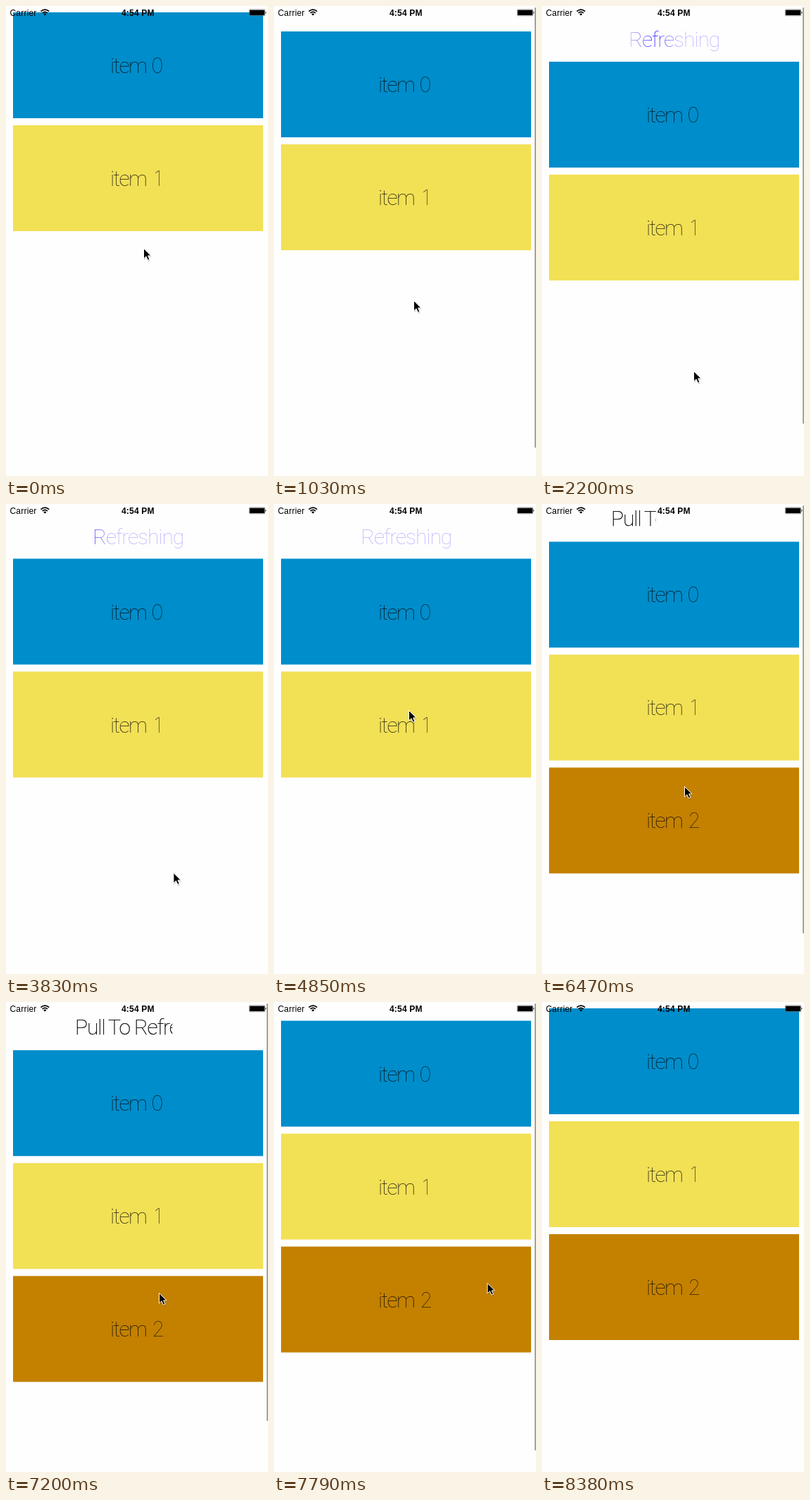
An HTML page that plays this animation: 372 px wide and 666 px high, repeating every 8820 ms.

```html
<!DOCTYPE html>
<html lang="en">
<head>
<meta charset="utf-8">
<title>Pull to refresh</title>
<style>
  html, body { margin: 0; width: 100%; height: 100%; overflow: hidden; background: #fefefe; }
  svg { display: block; width: 372px; height: 666px; }
  .thin { font: 100 30px Roboto, Inter, Lato, sans-serif; letter-spacing: -1.05px; }
  .item { letter-spacing: -1.6px; opacity: .82; }
  .digit { font-family: Inter, Roboto, sans-serif; }
  .status { font: 12px "Liberation Sans", Arial, sans-serif; letter-spacing: .2px; }
  .bold { font-weight: 700; }
</style>
</head>
<body>
<svg viewBox="0 0 372 666">
  <defs>
    <linearGradient id="shine" gradientUnits="userSpaceOnUse" x1="-35" x2="35" y1="0" y2="0">
      <stop offset="0" stop-color="#b9b2ff"/>
      <stop offset=".5" stop-color="#2a1cff"/>
      <stop offset="1" stop-color="#b9b2ff"/>
    </linearGradient>
    <clipPath id="reveal"><rect id="wipe" x="98" y="-70" width="0" height="70"/></clipPath>
  </defs>

  <g id="content">
    <g id="pullLabel" class="thin" clip-path="url(#reveal)" stroke="#000" stroke-width=".25">
      <text y="-22.5"><tspan x="98">Pull</tspan><tspan x="145">To</tspan><tspan x="182">Refresh</tspan></text>
    </g>
    <text id="busyLabel" class="thin" x="123.3" y="-20.7" fill="url(#shine)">Refreshing</text>
    <g id="cards"></g>
  </g>

  <rect id="bar" x="370" y="2" width="2" rx="1" fill="#a3a3a3"/>

  <g id="statusBar">
    <text class="status" x="5.5" y="14">Carrier</text>
    <text class="status bold" x="164" y="14">4:54 PM</text>
    <g fill="none" stroke="#000" stroke-width="1.7">
      <path d="M49.4 7.6Q55.3 2.6 61.2 7.6"/>
      <path d="M51.6 9.9Q55.3 6.8 59 9.9"/>
    </g>
    <path d="M53.2 11.4Q55.3 9.8 57.4 11.4L55.3 13.6Z"/>
    <rect x="345.3" y="5" width="22.4" height="8.8" rx="1" fill="none" stroke="#666" stroke-width=".7"/>
    <rect x="346" y="5.7" width="21" height="7.4" rx=".5"/>
    <path d="M368.4 7.6Q370.4 9.4 368.4 11.2Z"/>
  </g>

  <g id="cursor">
    <path d="M1 2V17L4.5 13.8L7 19.3L9.6 18.2L7.2 12.8H12Z" opacity=".18"/>
    <path d="M.5 .5V15L4 11.8L6.4 17.2L8.9 16.1L6.6 10.9H11Z" stroke="#fff" stroke-linejoin="round"/>
  </g>
</svg>

<script>
const TICK = 147, TICKS = 60, REST = 9;

// Moments of the story, counted in ticks
const DRAG = 3, LET_GO = 13, BUSY = 14, DONE = 35, DRAG2 = 39, LET_GO2 = 51, SETTLED = 57;

// Pointer path: [tick, x, y]
const PATH = [
  [DRAG, 195, 343], [7, 198, 417], [12, 213, 514], [15, 215, 517], [19, 244, 555], [25, 244, 555],
  [33, 191, 292], [DRAG2, 191, 292], [44, 202, 400], [49, 217, 412], [LET_GO2, 221, 416], [55, 384, 380]
];

const $ = id => document.getElementById(id);
const ramp = (k, a, b) => Math.min(1, Math.max(0, (k - a) / (b - a)));
const smooth = f => f * f * (3 - 2 * f);
const show = (el, on) => el.setAttribute("visibility", on ? "visible" : "hidden");
const move = (el, x, y) => el.setAttribute("transform", `translate(${x} ${y})`);

// How far the list is pulled below its resting place
function pullAt(k) {
  if (k <= LET_GO) return 79 * smooth(ramp(k, DRAG, 12) ** 1.15);
  if (k <= DONE) return 68.5 + 10.5 * Math.exp(LET_GO - k);
  if (k <= DRAG2) return 68.5 * (1 - ramp(k, DONE, 37)) ** 1.6;
  if (k <= LET_GO2) return 59.3 * (1 - (1 - ramp(k, DRAG2, 49)) ** 2);
  return 59.3 * (1 - ramp(k, LET_GO2, SETTLED)) ** 3;
}

function pointerAt(k) {
  let [, x, y] = PATH[0];
  for (let i = 1; i < PATH.length; i++) {
    const [t0, x0, y0] = PATH[i - 1], [t1, x1, y1] = PATH[i];
    const f = ramp(k, t0, t1);
    x += (x1 - x0) * f;
    y += (y1 - y0) * f;
  }
  return [x, y];
}

function barOpacity(k) {
  if (k < DRAG2) return k > DRAG ? 1 - ramp(k, 16, 19) : 0;
  return k > DRAG2 ? 1 - ramp(k, 55, SETTLED) : 0;
}

const digitX = [206, 210, 207];
$("cards").innerHTML = ["#008dcb", "#f2e055", "#c48100"].map((color, i) => `
  <g transform="translate(0 ${i * 160})">
    <rect x="10" width="355" height="150" fill="${color}"/>
    <text class="thin item" x="148" y="86">item <tspan class="digit" x="${digitX[i]}">${i}</tspan></text>
  </g>`).join("");
const third = $("cards").lastElementChild;

function draw(ms) {
  const k = Math.floor((ms + 14) / TICK) % TICKS;
  const pull = pullAt(k);
  const busy = k >= BUSY && k <= DONE;
  move($("content"), 0, REST + pull);

  // The label is written from left to right as the pull grows
  const drawn = ramp(pull, 32.2, 68);
  $("wipe").setAttribute("width", 2 + drawn * 180);
  show($("pullLabel"), !busy && drawn > 0);
  show($("busyLabel"), busy);
  const shineX = k < 25 ? 160 + 35 * (k - 15) : 90 + 25 * (k - 25);
  move($("shine"), 0, 0);
  $("shine").setAttribute("gradientTransform", `translate(${shineX} 0)`);

  third.setAttribute("opacity", ramp(k, DONE, 37));
  $("bar").setAttribute("height", (busy ? 660 : 651) - pull);
  $("bar").setAttribute("opacity", barOpacity(k));

  move($("cursor"), ...pointerAt(k));
  show($("cursor"), k < 55);
}

const start = performance.now();
function frame() {
  draw((performance.now() - start) % (TICK * TICKS));
  requestAnimationFrame(frame);
}
frame();
</script>
</body>
</html>
```
